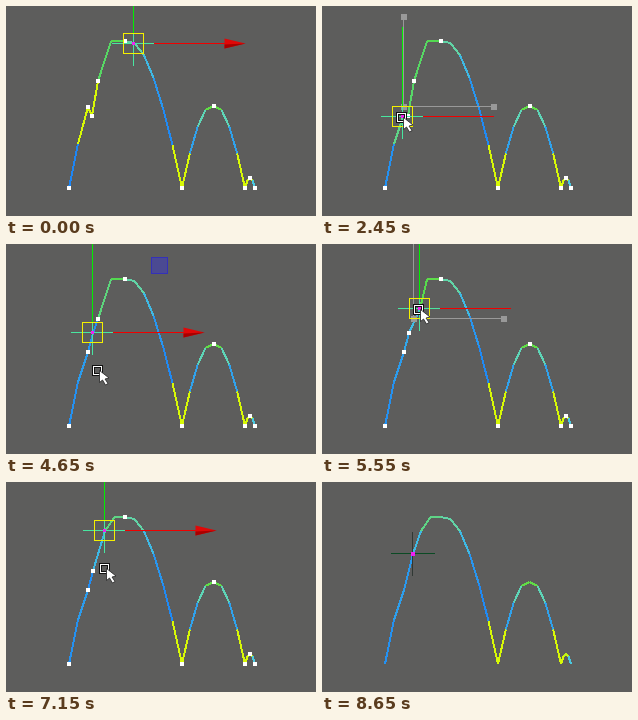
These frames come from a looping animation (310 by 210 pixels, 9.3 s). An HTML page:

```html
<!DOCTYPE html>
<html lang="en">
<head>
<meta charset="utf-8">
<title>Curve editing</title>
<style>
html, body { margin: 0; width: 100%; height: 100%; overflow: hidden; background: #5d5d5c; }
svg { display: block; width: 310px; height: 210px; }
</style>
</head>
<body>
<svg id="stage" viewBox="0 0 310 210"></svg>
<script>
const LOOP = 9300, STEP = 50;
const stage = document.getElementById('stage');

// Point moves: begin, end, x, y; the point rests between moves
const points = {
  pivot: { home: [128, 38], moves: [] },
  A: { home: [82, 101], moves: [[2150, 2450, 81, 111], [2600, 2700, 82, 108]] },
  B: { home: [86, 110], moves: [[3800, 4150, 87, 89], [7500, 7750, 96, 69], [7850, 7950, 92, 115], [8000, 8050, 91, 72]] },
  C: { home: [92, 75], moves: [[5150, 5550, 98, 65], [5650, 5800, 97, 60], [5900, 6250, 95, 86],
    [6350, 6400, 95, 54], [6400, 6500, 98, 64], [6750, 6850, 99, 49]] }
};

const phases = [
  [0, 'idle', 'pivot'], [650, 'marquee'], [1150, 'cross', 'A'], [1400, 'idle', 'A'],
  [2150, 'drag', 'A'], [2700, 'idle', 'A'], [3700, 'hot', 'B'], [3800, 'drag', 'B'],
  [4350, 'idle', 'B'], [5050, 'idle', 'C'], [5150, 'drag', 'C'], [7050, 'idle', 'C'],
  [7400, 'idle', 'B'], [7500, 'drag', 'B'], [8300, 'idle', 'B'], [8500, 'cross', 'B'], [8650, 'done', 'B']
];

// Free cursor trips: leave, arrive away, turn back, grab, away x, y
const trips = [
  [1400, 1650, 1800, 2150, 6, 164], [2750, 2950, 3250, 3700, 70, 196],
  [4350, 4550, 4550, 4750, 98, 164], [4950, 5000, 5000, 5050, 94, 84],
  [7050, 7250, 7250, 7400, 100, 124], [8300, 8500, 8500, 8550, 112, -20]
];

const ease = k => k * k * (3 - 2 * k);
const part = (t, a, b) => ease(Math.min(1, Math.max(0, (t - a) / (b - a))));
const mix = (p, q, k) => p.map((v, i) => v + (q[i] - v) * k);
const phaseAt = t => phases.filter(p => p[0] <= t).pop();

const place = (name, t) => points[name].moves.reduce(
  (p, [a, b, ...to]) => mix(p, to, part(t, a, b)), points[name].home);

function grip(t) {
  const [x, y] = place(phaseAt(t)[2], t);
  return [x - 1, y + 1];
}

function cursorAt(t) {
  const trip = trips.find(p => t >= p[0] && t < p[3]);
  if (!trip) return grip(t);
  const [a, b, c, d, ...away] = trip;
  const from = trip === trips[0] ? [206, 196] : grip(a - STEP);
  return t < c ? mix(from, away, part(t, a, b)) : mix(away, grip(d), part(t, c, d));
}

// Arch of 2n segments (or its right half) around a crest
function arch(cx, top, w, h, n, first = -n) {
  return Array.from({ length: n - first + 1 }, (_, i) => {
    const v = (i + first) / n, u = Math.abs(v);
    return [cx + w * v, top + h * (u * u - 0.016 * Math.sin(2 * Math.PI * u))];
  });
}
const rest = [...arch(119, 35, 57, 147, 6, 0), ...arch(207.5, 100, 31.5, 82, 4).slice(1), ...arch(244, 172, 5, 10, 2).slice(1)];
const knots = [[63, 182], ...[0, 6, 10, 14, 16, 18].map(i => rest[i])];

const line = (x1, y1, x2, y2, c, w = 1) =>
  `<line x1="${x1}" y1="${y1}" x2="${x2}" y2="${y2}" stroke="${c}" stroke-width="${w}"/>`;
const box = (x, y, r, fill, stroke = 'none', w = 1) =>
  `<rect x="${x - r}" y="${y - r}" width="${2 * r}" height="${2 * r}" fill="${fill}" stroke="${stroke}" stroke-width="${w}"/>`;
const shape = (d, fill, extra = '') => `<path d="${d}" fill="${fill}" ${extra}/>`;
const crisp = s => `<g shape-rendering="crispEdges">${s}</g>`;

// Straight is blue, a sharp bend is yellow
function tint(bend) {
  const k = Math.min(1, bend / 60), hump = Math.sin(Math.PI * k);
  return `hsl(${213 - 145 * k ** 1.2},${95 - 38 * hump}%,${53 + 9 * hump - 3 * k}%)`;
}

function curve(A, B, C) {
  const mid = [105 + Math.max(0, 62 - C[1]) / 4, 35.5];
  const p = [[63, 182], [72, 138], A, B, C, mid, ...rest];
  const dir = p.slice(1).map((q, i) => Math.atan2(q[1] - p[i][1], q[0] - p[i][0]));
  const bend = p.map((_, i) => {
    if (!i || i === p.length - 1) return 0;
    const d = Math.abs(dir[i] - dir[i - 1]);
    return Math.min(d, 2 * Math.PI - d) * 180 / Math.PI;
  });
  return crisp(dir.map((_, i) =>
    line(...p[i], ...p[i + 1], tint((bend[i] + bend[i + 1]) / 2), 2)).join(''));
}

const cross = (x, y, h, v) => line(x - 22, y, x + 22, y, h) + line(x, y - 22, x, y + 22, v);

function ghost(x, y) {
  const c = '#999';
  return line(x, y - .5, x + 90, y - .5, c) + line(x - .5, y, x - .5, y - 90, c) +
    box(x, y, 3, c) + box(x + 90, y, 3, c) + box(x, y - 90, 3, c);
}

function manip(mode, x, y) {
  const teal = '#48e6a0', hot = mode === 'hot';
  let s = cross(x, y, teal, teal);
  if (mode !== 'cross') {
    s += line(x, y - 10, x, y - 90, '#00f000');
    s += line(x + 20, y, x + 91, y, hot ? '#6a2020' : '#f00000');
    s += box(x, y, 10, 'none', hot ? '#efb478' : '#f4f000');
  }
  s = crisp(s + box(x, y, 1.5, '#f020f0'));
  if (mode === 'idle' || hot) {
    s += shape(`M${x + 91} ${y - 5}l21 5l-21 5Z`, '#e00808');
    s += shape(`M${x + 91} ${y + 1}l21 -1l-21 5Z`, '#a80000');
    s += shape(`M${x - 4.5} ${y - 90}l4.5 -19l4.5 19Z`, '#00f000');
    s += crisp(box(x + 67, y - 67, 8, '#4b4a92', '#3431b8'));
  }
  return s;
}

function cursor(x, y) {
  return crisp(box(x, y, 4, 'none', '#111', 3) + box(x, y, 4, 'none', '#fff')) +
    shape(`M${x + 2} ${y}l0 12l3 -2.5l3 5l2.5 -1.5l-3 -4.5l4 -1Z`, '#fff', 'stroke="#222" stroke-width=".8"');
}

function draw(t) {
  const [start, mode, sel] = phaseAt(t);
  const [A, B, C] = ['A', 'B', 'C'].map(n => place(n, t));
  const at = sel && place(sel, t).map(v => Math.round(v) - .5);
  let s = curve(A, B, C);

  if (mode !== 'done') {
    const loose = ['A', 'B', 'C'].filter(n => n !== sel).map(n => place(n, t));
    s += crisp([...knots, ...loose].map(p => box(...p.map(Math.round), 2, '#fff')).join(''));
  }
  if (mode === 'marquee') {
    const k = Math.min(1, (t - 600) / 300);
    s += crisp(`<rect x="50.5" y="${159.5 - 65 * k}" width="${34 * k}" height="${65 * k}" fill="none" stroke="#ddd" stroke-dasharray="3 2"/>`);
  } else if (mode === 'done') {
    s += crisp(cross(...at, '#0b4a24', '#303834') + box(...at, 2, '#f020f0'));
  } else {
    if (mode === 'drag') s += crisp(ghost(...place(sel, start)));
    s += manip(mode, ...at);
  }
  if (t >= 1400 && t < 8500) s += cursor(...cursorAt(t).map(v => Math.round(v) - .5));
  stage.innerHTML = s;
}

let last = -1;
function tick() {
  const t = Math.floor((performance.now() % LOOP) / STEP) * STEP;
  if (t !== last) draw(last = t);
  requestAnimationFrame(tick);
}
tick();
</script>
</body>
</html>
```
